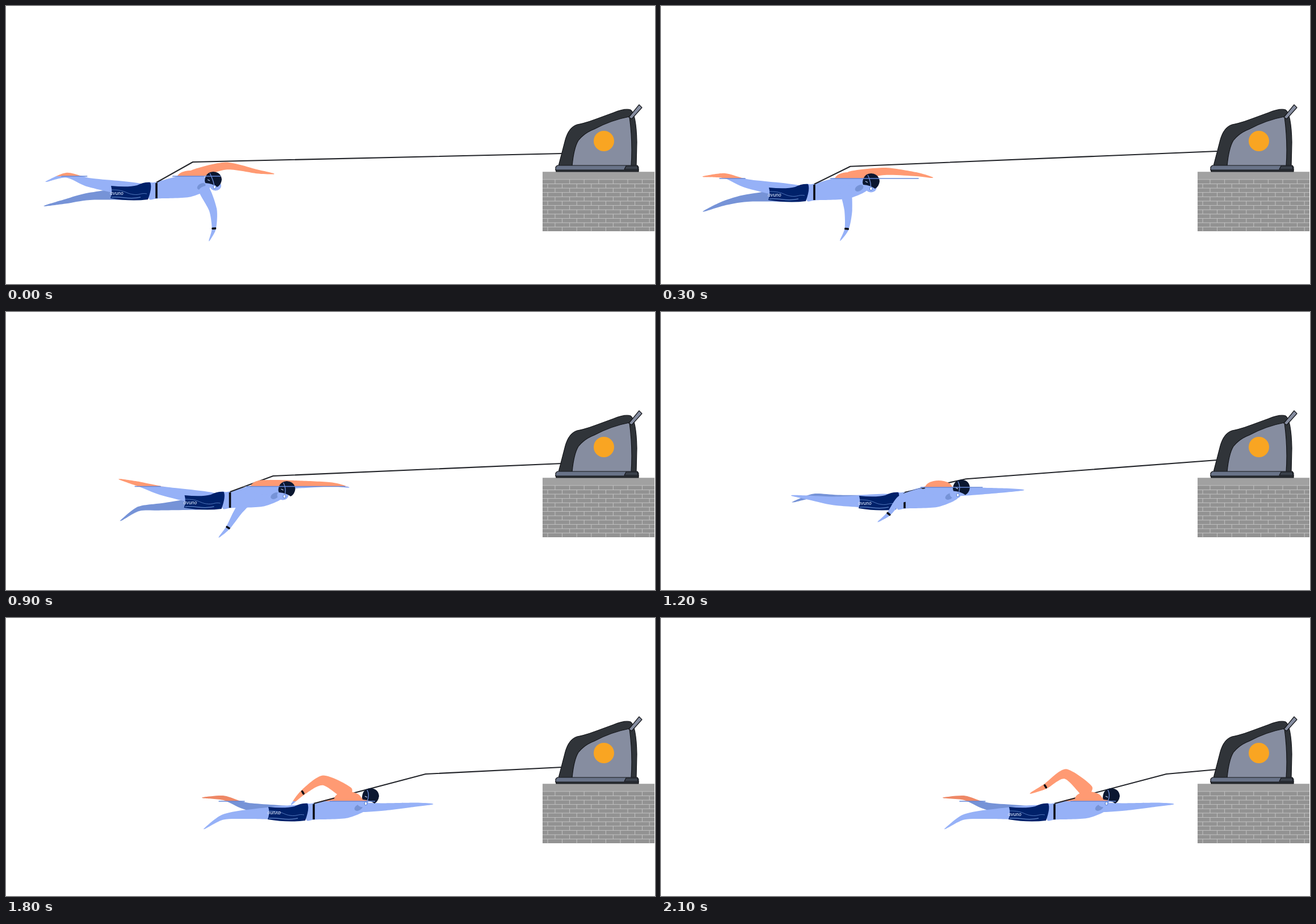
Animation of 1143 by 490 pixels, one loop 2.4 s. Source, as an HTML page:

```html
<!DOCTYPE html>
<html lang="en">
<head>
<meta charset="utf-8">
<title>Tethered swim</title>
<style>
html, body { margin: 0; width: 100%; height: 100%; overflow: hidden; background: #fff; }
svg { display: block; width: 100%; height: 100%; }
text { font: italic 500 8px Inter, Arial, sans-serif; fill: #d3ddf5; text-anchor: middle; }
</style>
</head>
<body>
<svg viewBox="0 0 1143 490">
  <rect x="945" y="292.5" width="197" height="104.5" fill="#929292"/>
  <rect x="945" y="292.5" width="197" height="13" fill="#a1a1a1"/>
  <path id="mortar" fill="none" stroke="#c2c2c2"/>
  <g stroke="#15171b" stroke-width="1.2" stroke-linejoin="round">
    <path fill="#303439" d="M973 282L985 236Q991 214 1006 209Q1022 206 1040 199L1070 188Q1090 180 1100 183Q1110 190 1111 240L1110 282Z"/>
    <path fill="#868da0" d="M997 282Q1000 250 1008 237Q1018 224 1036 217Q1066 201 1098 195Q1104 240 1101 282Z"/>
    <path fill="#868da0" d="M1097 196L1115 174L1120 179L1102 199Z"/>
    <path fill="#2c3035" d="M968 288H1114V292H969Z"/>
    <path fill="#697388" d="M971 281H1112L1114 284V289H968V284Z"/>
    <path fill="#3b414b" d="M1092 282H1112L1113 288H1089Z"/>
  </g>
  <circle cx="1053" cy="238" r="18" fill="#f9a522"/>
  <clipPath id="above"><rect id="sky" width="1143"/></clipPath>
  <clipPath id="below"><rect id="pool" width="1143" height="490"/></clipPath>
  <g id="dry" clip-path="url(#above)"></g>
  <g id="wet" clip-path="url(#below)"></g>
  <g id="surface" stroke="#6688d8" stroke-width="1.4"></g>
</svg>
<script>
const STEP = 300;
const NAVY = '#00216a', INK = '#23252a', BLACK = '#0a0c12';
const AIR = { skin: '#ff9a73', deep: '#ee8866' };
const WATER = { skin: '#96b1f7', deep: '#7693d7' };
const LEG = [93, 43, 36], ARM = [62, 56, 28], STROKE = [44, 36, 24];
const $ = id => document.getElementById(id);

// Joint angles in degrees; positions are relative to the belt.
const pull = {
  belt: [265, 325], water: 300, near: [-9, -18, 17], far: [4, 12, 12],
  reachY: -27, reach: [-15, 10, 8], shoulder: [83, -3], stroke: [66, 87, 111], size: 0.92,
  headY: -19, turn: 4, wake: 113, bend: [64, -50], end: 260
};
const press = {
  belt: [342, 332], water: 307.5, near: [-10, -20, -8], far: [4, 13, 28],
  reachY: -29, reach: [-3, 2, 14], shoulder: [36, -12], stroke: [94, 100, 124], size: 0.92,
  headY: -19, turn: -3, wake: 231, bend: [63, -42], end: 260
};
const push = {
  belt: [394.5, 331], water: 307.5, near: [-10, -16, -14], far: [5, 5, 33],
  reachY: -26, reach: [-1, 0, 10], shoulder: [39, -11], stroke: [128, 122, 133], size: 0.92,
  headY: -19, turn: -7, wake: 203, bend: [76, -42], end: 267
};
const glide = {
  belt: [485.5, 334], water: 312, near: [2, -5, -6], far: [-6, -8, 13],
  reachY: -13, reach: [-1, -2, -3], shoulder: [31, -12], stroke: [172, 131, 145], size: 0.92,
  headY: -23, turn: -11, wake: 126, bend: [114, -37], end: 264
};
const exit = {
  belt: [542, 341], water: 323, near: [2.5, 7, 32], far: [-8, -20, -1],
  reachY: -7, reach: [-1, -4, -2], shoulder: [61, -31], stroke: [208, 149, 134], size: 1.15,
  headY: -27, turn: -14, wake: 108, bend: [197, -66], end: 263, flip: 1
};

const lerp = (a, b, k) => Array.isArray(a) ? a.map((v, i) => lerp(v, b[i], k)) : a + (b - a) * k;

function mix(a, b, k, extra) {
  const out = {};
  for (const key in a) out[key] = lerp(a[key], b[key], k);
  return { ...out, ...extra };
}

const poses = [
  pull,
  mix(pull, press, 0.6, { belt: [270, 328], water: 304, end: 256 }),
  press,
  push,
  mix(push, glide, 0.85, { belt: [429, 332], water: 309, end: 261 }),
  glide,
  exit,
  { ...exit, belt: [693, 341], shoulder: [59, -35], stroke: [218, 148, 155], end: 267, flip: 0 }
];

// Joints reached by following bones from a start point
function chain(start, bones, angles, dir = 1) {
  let [x, y] = start;
  return [start, ...bones.map((len, i) => {
    const a = angles[i] * Math.PI / 180;
    return [x += dir * len * Math.cos(a), y += len * Math.sin(a)];
  })];
}

// Smooth tapered outline around a chain of joints
function limb(joints, radii, fill) {
  const left = [], right = [];
  joints.forEach(([x, y], i) => {
    const a = joints[Math.max(0, i - 1)], b = joints[Math.min(joints.length - 1, i + 1)];
    const dx = b[0] - a[0], dy = b[1] - a[1], s = radii[i] / Math.hypot(dx, dy);
    left.push([x - dy * s, y + dx * s]);
    right.unshift([x + dy * s, y - dx * s]);
  });
  const pts = [...left, ...right], at = i => pts[(i + pts.length) % pts.length];
  const lean = (p, a, b, k) => p.map((v, m) => v + (b[m] - a[m]) * k);
  const d = pts.map((p, i) => {
    const q = at(i + 1);
    return `C${lean(p, at(i - 1), q, 0.13)} ${lean(q, p, at(i + 2), -0.13)} ${q}`;
  });
  return `<path d="M${pts[0]}${d.join('')}Z" fill="${fill}"/>`;
}

const curve = (d, stroke, width) =>
  `<path d="${d}" fill="none" stroke="${stroke}" stroke-width="${width}" stroke-linejoin="round"/>`;
const oval = (x, y, rx, ry, fill, extra = '') =>
  `<ellipse cx="${x}" cy="${y}" rx="${rx}" ry="${ry}" fill="${fill}" ${extra}/>`;

function shorts(flip) {
  return `<path d="M-80 -8Q-50 -5 -34 -9Q-22 -15 -11 -14Q-7 -6 -15 16Q-45 20 -81 14Q-77 3 -80 -8Z" fill="${NAVY}"/>` +
    curve('M-79 -1C-55 -1 -55 5 -42 7S-28 4 -17 6', '#5578bd', 1) +
    curve('M-79 12C-60 10 -50 17 -28 12', '#5578bd', 1.5) +
    `<text x="-70" y="8" ${flip ? 'transform="rotate(180 -70 4)"' : ''}>avuno</text>`;
}

function head(y, turn, skin) {
  return `<g transform="translate(100 ${y})">` +
    oval(turn, 11, 10, 8.5, skin) +
    `<path d="M-15 2Q-14 -13 0 -14Q14 -13 15 0Q14 9 7 13Q-1 7 -14 6Z" fill="#0b1730"/>` +
    curve(`M-6 -11Q0 0 ${turn * 0.6} 13`, '#7393df', 1.3) +
    curve('M-10 0l4 2', '#c4d2f6', 1.2) +
    oval(turn * 0.6, 13, 2.4, 3, '#f2f6ff', 'stroke="#4d78cf"') + '</g>';
}

function legs(p) {
  return {
    near: chain([-25, 1], LEG, p.near, -1),
    far: chain([-25, 4], LEG, p.far, -1)
  };
}

function swimmer(p, { skin, deep }) {
  const [x, y] = p.belt, leg = legs(p);
  const arm = chain(p.shoulder, STROKE.map(n => n * p.size), p.stroke);
  const wrist = arm[2], slant = p.stroke[1] + 90;
  return `<g transform="translate(${x} ${y})">` + [
    limb(leg.far, [11, 6.5, 4, 1], deep),
    limb(leg.near, [12, 8, 4.5, 1], skin),
    limb(chain([62, p.reachY], ARM, p.reach), [8, 6.5, 3.5, 1], skin),
    limb([[-14, 1], [0, 0], [55, -8], [92, -12]], [14, 14.5, 20, 9], skin),
    shorts(p.flip),
    oval(79, -7, 8, 5, deep, 'transform="rotate(-30 79 -7)"'),
    curve('M0 -13V14', BLACK, 3.6),
    curve(`M0 -14L${p.bend}L${979 - x} ${p.end - y}`, INK, 2.1),
    oval(60, -22, 24, 13, skin),
    head(p.headY, p.turn, skin),
    limb(arm, [10, 7.5, 4, 1].map(r => r * p.size), skin),
    `<rect x="-4" y="-1.8" width="8" height="3.6" rx="1.5" fill="${BLACK}" transform="translate(${wrist}) rotate(${slant})"/>`
  ].join('') + '</g>';
}

// Surface lines at the shoulders and around any raised ankle
function ripples(p) {
  const [x, y] = p.belt, w = p.water;
  const row = (a, b) => `<path d="M${x + a} ${w}H${x + b}"/>`;
  const raised = Object.values(legs(p)).map(j => j[2]).filter(a => a[1] + y < w);
  return row(28, p.wake) + raised.map(a => row(a[0] - 10, a[0] + 36)).join('');
}

function show(p) {
  $('sky').setAttribute('height', p.water);
  $('pool').setAttribute('y', p.water);
  $('dry').innerHTML = swimmer(p, AIR);
  $('wet').innerHTML = swimmer(p, WATER);
  $('surface').innerHTML = ripples(p);
}

function bricks() {
  const h = 7.62, w = 25.6;
  let d = '';
  for (let r = 0; r < 12; r++) {
    const y = 305.8 + r * h;
    d += `M945 ${y}H1142`;
    for (let x = 945 + (r % 2 ? 9 : 22); x < 1142; x += w) d += `M${x} ${y}v${h}`;
  }
  return d;
}

$('mortar').setAttribute('d', bricks());
const start = performance.now();
let shown = -1;

function tick() {
  const i = Math.floor((performance.now() - start) / STEP) % poses.length;
  if (i !== shown) show(poses[shown = i]);
  requestAnimationFrame(tick);
}
tick();
</script>
</body>
</html>
```
